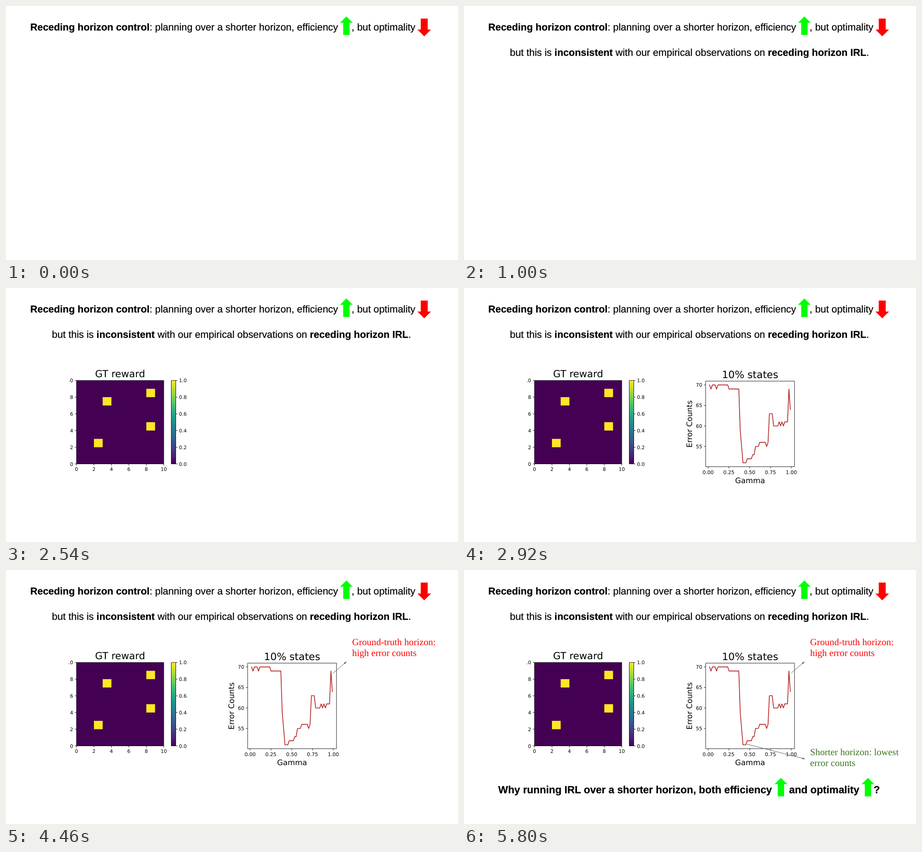
Animation of 997 by 561 pixels, one loop 6760 ms. Source, as an HTML page:

```html
<!DOCTYPE html>
<html lang="en">
<head>
<meta charset="utf-8">
<title>Receding horizon IRL</title>
<style>
html, body { margin: 0; width: 100%; height: 100%; overflow: hidden; background: #fff; }
svg { display: block; text-rendering: geometricPrecision; }
.step { visibility: hidden; }
.slide { font: 21.83px "Liberation Sans", Arial, sans-serif; }
.slide text { stroke: #000; stroke-width: .25; }
.slide .b { font-weight: bold; }
.question { font-weight: bold; font-size: 22.85px; }
.note { font: 20.8px "Liberation Serif", "Times New Roman", serif; }
.plot { font-family: "DejaVu Sans", sans-serif; }
.mid { text-anchor: middle; }
.end { text-anchor: end; }
.axis { fill: none; stroke: #000; stroke-width: .9; }
.pointer { stroke: #595959; stroke-width: 1; }
</style>
</head>
<body>
<svg width="997" height="561" viewBox="0 0 997 561">
  <defs>
    <linearGradient id="viridis" x1="0" y1="1" x2="0" y2="0"></linearGradient>
    <path id="up" fill="#0f0" d="M0 0L14 14H7V41H-7V14H-14Z"/>
    <marker id="head" viewBox="0 0 6 4" refX="6" refY="2" markerWidth="6" markerHeight="4" orient="auto">
      <path d="M0 0L6 2L0 4Z" fill="#595959"/>
    </marker>
  </defs>

  <g class="slide">
    <text x="53.5" y="54"><tspan class="b">Receding horizon control</tspan>: planning over a shorter horizon, efficiency</text>
    <use href="#up" x="750.8" y="23"/>
    <text x="762.3" y="54">, but optimality</text>
    <path fill="#f00" d="M922.5 67L907.5 52H914.8V27.7H930.2V52H937.5Z"/>
  </g>

  <g class="step slide">
    <text x="101.3" y="110">but this is <tspan class="b">inconsistent</tspan> with our empirical observations on <tspan class="b">receding horizon IRL</tspan>.</text>
  </g>

  <g class="step plot" id="reward" font-size="10.75">
    <text class="mid" x="251.7" y="197.3" font-size="21.5">GT reward</text>
    <rect x="155.5" y="204.2" width="192.5" height="184.3" fill="#440154"/>
    <rect x="364.5" y="204.2" width="10" height="184.3" fill="url(#viridis)"/>
  </g>

  <g class="step plot" id="errors" font-size="11">
    <text class="mid" x="631" y="199.4" font-size="22.2">10% states</text>
    <text class="mid" x="631" y="430.6" font-size="16.7">Gamma</text>
    <text class="mid" transform="translate(502.8 300.3) rotate(-90)" font-size="16.7">Error Counts</text>
    <path class="axis" d="M533 205.7H729V394.7H533Z"/>
  </g>

  <g class="step note" fill="#f00">
    <text x="763.5" y="165.8">Ground-truth horizon:</text>
    <text x="763.5" y="190.2">high error counts</text>
    <path class="pointer" d="M721.8 227.5L751 202.6" marker-end="url(#head)"/>
  </g>

  <g class="step note" fill="#38761d">
    <text x="763.5" y="408.8">Shorter horizon: lowest</text>
    <text x="763.5" y="433.2">error counts</text>
    <path class="pointer" d="M623.8 384.7L752 417.3" marker-end="url(#head)"/>
  </g>

  <g class="step slide question">
    <text x="75.6" y="493">Why running IRL over a shorter horizon, both efficiency</text>
    <use href="#up" x="699" y="459"/>
    <text x="717" y="493">and optimality</text>
    <use href="#up" x="891" y="459"/>
    <text x="903.6" y="493">?</text>
  </g>
</svg>

<script>
const LOOP = 6760, FIRST = 1000, STEP = 960;
const $ = id => document.getElementById(id);

function add(parent, tag, attrs, text = '') {
  const el = document.createElementNS('http://www.w3.org/2000/svg', tag);
  for (const key in attrs) el.setAttribute(key, attrs[key]);
  el.textContent = text;
  parent.append(el);
}
const line = (g, d) => add(g, 'path', { class: 'axis', d });

function tickX(g, x, y, label, gap) {
  line(g, `M${x} ${y}v3.7`);
  add(g, 'text', { class: 'mid', x, y: y + gap }, label);
}
function tickY(g, x, y, label) {
  line(g, `M${x} ${y}h-3.7`);
  add(g, 'text', { class: 'end', x: x - 7.4, y: y + 4 }, label);
}

const colors = '440154 482878 3e4989 31688e 26828e 1f9e89 35b779 6ece58 b5de2b fde725'.split(' ');
colors.forEach((c, i) => add($('viridis'), 'stop', { offset: i / 9, 'stop-color': '#' + c }));

// Reward map
const reward = $('reward');
const rx = v => 155.5 + 19.25 * v, ry = v => 388.5 - 18.43 * v;
for (const [x, y] of [[2, 2], [3, 7], [8, 4], [8, 8]])
  add(reward, 'rect', { x: rx(x), y: ry(y + 1), width: 19.25, height: 18.43, fill: '#fde725' });
line(reward, 'M155.5 204.2H348V388.5H155.5ZM364.5 204.2H374.5V388.5H364.5Z');
for (let v = 0; v <= 10; v += 2) {
  tickX(reward, rx(v), 388.5, v, 15.7);
  tickY(reward, 155.5, ry(v), v < 10 ? v : '.0'); // the top label is cut off
  line(reward, `M374.5 ${ry(v)}h3.7`);
  add(reward, 'text', { x: 381.4, y: ry(v) + 4 }, (v / 10).toFixed(1));
}

// Error curve, as [sample, count] corners
const errors = $('errors');
const ey = v => 214.1 + (70 - v) * 9.06;
for (let v = 0; v <= 1; v += .25) tickX(errors, 538.4 + 183.6 * v, 394.7, v.toFixed(2), 16.2);
for (let v = 55; v <= 70; v += 5) tickY(errors, 533, ey(v), v);
const corners = [[0, 70], [1, 69], [2, 70], [4, 70], [5, 69], [6, 70], [13, 70], [14, 69], [21, 69],
  [22, 59], [24, 51], [26, 51], [27, 52], [30, 52], [31, 53], [32, 53], [33, 55], [35, 55], [36, 56],
  [40, 56], [41, 55], [42, 56], [43, 63], [45, 63], [46, 60], [49, 60], [50, 61], [51, 60], [52, 61],
  [53, 60], [54, 61], [56, 61], [57, 69], [58, 64]];
add(errors, 'polyline', {
  points: corners.map(([k, v]) => [541.7 + 3.07 * k, ey(v)]).join(' '),
  fill: 'none', stroke: '#b22222', 'stroke-width': 1.65,
  'stroke-linecap': 'square', 'stroke-linejoin': 'round'
});

const steps = document.querySelectorAll('.step');
function draw() {
  const t = performance.now() % LOOP;
  steps.forEach((g, i) => g.style.visibility = t >= FIRST + i * STEP ? 'visible' : 'hidden');
  requestAnimationFrame(draw);
}
draw();
</script>
</body>
</html>
```
